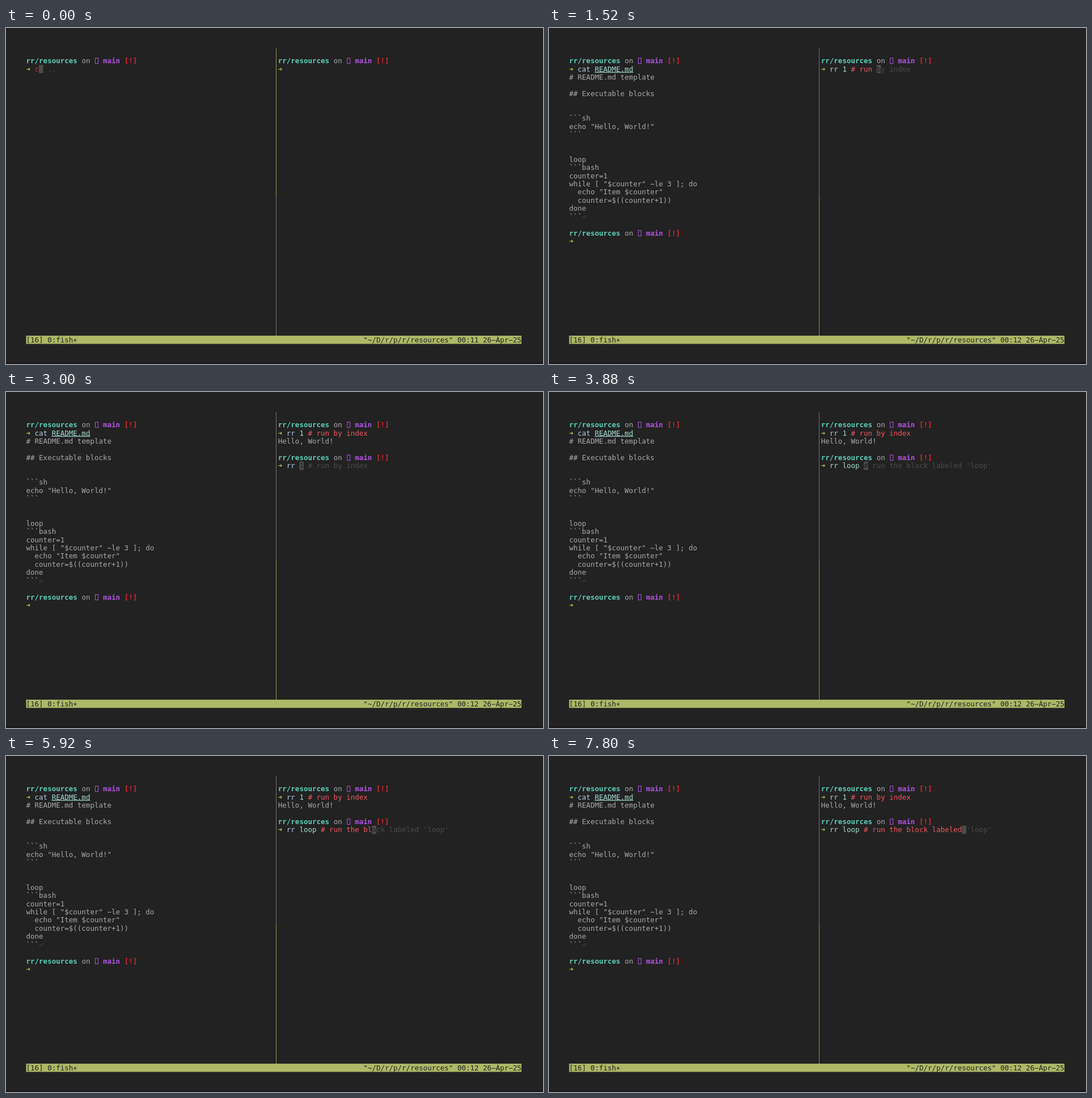
Write an HTML page that moves like this. It is 947x592 px and loops after 8000 ms.

```html
<!DOCTYPE html>
<html lang="en">
<head>
<meta charset="utf-8">
<title>Terminal session</title>
<style>
  html, body { margin: 0; width: 100%; height: 100%; overflow: hidden; background: #222; }
  svg { display: block; width: 947px; height: 592px; }
  text { font: 12.5px "DejaVu Sans Mono", "DejaVu Sans", monospace; white-space: pre; }
  .bold { font-weight: bold; }
  .path { text-decoration: underline; }
</style>
</head>
<body>
<svg id="stage" viewBox="0 0 947 592"></svg>
<script>
const stage = document.getElementById('stage');
const LOOP = 8000, LEFT = 35.5, TOP = 36, CELL_W = 7.53, CELL_H = 14.46;
const RIGHT_PANE = 59, COLUMNS = 116, STATUS_ROW = 35;
const COLOR = {
  text: '#a9a9a9', teal: '#5dcfb8', purple: '#b052e2', red: '#dc2630', arrow: '#b5c248',
  command: '#b9cbe6', argument: '#a5dad0', comment: '#f0575f', hint: '#4b4b4b',
  cursor: '#4c4c4c', ground: '#222', status: '#adb966', active: '#8d974f', idle: '#747474'
};

const README = `# README.md template

## Executable blocks


\`\`\`sh
echo "Hello, World!"
\`\`\`


loop
\`\`\`bash
counter=1
while [ "$counter" \u2212le 3 ]; do
  echo "Item $counter"
  counter=$((counter+1))
done
\`\`\``.replace('\n\n\nloop', '\n\n\n\nloop').split('\n').filter((line, i) => i !== 8);
const CAT = 'cat README.md';
const BY_INDEX = 'rr 1 # run by index';
const BY_LABEL = "rr loop # run the block labeled 'loop'";

const colX = col => LEFT + col * CELL_W;
const rowY = row => TOP + row * CELL_H;

function rect(x, y, w, h, fill) {
  return `<rect x="${x}" y="${y}" width="${w}" height="${h}" fill="${fill}"/>`;
}

function print(col, row, string, fill = COLOR.text, style = '') {
  return `<text x="${colX(col)}" y="${rowY(row) + 11.6}" fill="${fill}" class="${style}">${string}</text>`;
}

function cursor(col, row) {
  return rect(colX(col), rowY(row), CELL_W, CELL_H, COLOR.cursor);
}

function prompt(col, row) {
  return print(col, row, 'rr/resources', COLOR.teal, 'bold') +
    print(col + 13, row, 'on') +
    `<rect x="${colX(col + 16) + 1.5}" y="${rowY(row) + 2.6}" width="5" height="9.6" fill="none" stroke="${COLOR.purple}"/>` +
    print(col + 18, row, 'main', COLOR.purple, 'bold') +
    print(col + 23, row, '[!]', COLOR.red, 'bold') +
    print(col, row + 1, '➜', COLOR.arrow);
}

// A command line with shell highlighting; col is where the typing starts.
function commandLine(col, row, typed) {
  const [, command, args, comment] = typed.match(/^(\S*)([^#]*)(.*)$/);
  const known = command === 'cat' || command === 'rr';
  const argument = args.trim();
  return print(col, row, command, known ? COLOR.command : COLOR.red) +
    (argument && print(col + command.length + 1, row, argument, COLOR.argument,
      command === 'cat' ? 'path' : '')) +
    (comment && print(col + command.length + args.length, row, comment, COLOR.comment));
}

function typing(col, row, typed, suggestion = '') {
  const end = col + typed.length;
  const rest = suggestion.slice(typed.length);
  return commandLine(col, row, typed) + cursor(end, row) +
    print(end, row, rest.slice(0, 1), COLOR.ground) +
    print(end + 1, row, rest.slice(1), COLOR.hint);
}

function leftPane(t) {
  let out = prompt(0, 1);
  if (t < 280) {
    const count = 1 + 2 * Math.floor(t / 40);
    return out + typing(2, 2, CAT.slice(0, count), count === 1 ? 'c  ..' : CAT);
  }
  out += commandLine(2, 2, CAT);
  README.forEach((line, i) => { out += print(0, 3 + i, line); });
  out += print(3, 20, '⏎', COLOR.hint) + prompt(0, 22);
  return t < 1000 ? out + cursor(2, 23) : out;
}

function rightPane(t) {
  const col = RIGHT_PANE + 2;
  let out = prompt(RIGHT_PANE, 1);
  if (t < 1000) return out;
  if (t < 1320) return out + cursor(col, 2);
  if (t < 1760) {
    const count = 1 + 2 * Math.floor((t - 1320) / 40);
    return out + typing(col, 2, BY_INDEX.slice(0, count), count < 4 ? BY_LABEL : BY_INDEX);
  }
  out += commandLine(col, 2, BY_INDEX);
  if (t < 1840) return out + cursor(RIGHT_PANE, 3);
  out += print(RIGHT_PANE, 3, 'Hello, World!') + prompt(RIGHT_PANE, 5);
  if (t < 2480) return out + cursor(col, 6);
  if (t < 2520) return out + typing(col, 6, 'r');
  const count = Math.max(1, Math.floor((t - 2356) / 170.7));
  return out + typing(col, 6, BY_LABEL.slice(0, count), count < 4 ? BY_INDEX : BY_LABEL);
}

function frame(t) {
  const switched = t >= 960;
  const running = t >= 1760 && t < 1840;
  const title = running ? BY_INDEX + ' ~' : '~/D/r/p/r/resources';
  const status = `"${title}" 00:${switched ? 12 : 11} 26\u2212Ápr\u221225`;
  const middle = rowY(18), bottom = rowY(STATUS_ROW);
  return rect(0, 0, 947, 592, COLOR.ground) +
    rect(0, 589, 947, 3, '#1d181b') +
    rect(476, TOP, 1, middle - TOP, switched ? COLOR.idle : COLOR.active) +
    rect(476, middle, 1, bottom - middle, switched ? COLOR.active : COLOR.idle) +
    rect(LEFT, bottom, COLUMNS * CELL_W, CELL_H, COLOR.status) +
    print(0, STATUS_ROW, '[16] 0:fish\u2217', COLOR.ground) +
    print(COLUMNS - status.length, STATUS_ROW, status, COLOR.ground) +
    leftPane(t) + rightPane(t);
}

let shown = '';
const start = performance.now();
function tick(now) {
  // Screen updates land on a 40 ms grid.
  const t = Math.floor(Math.max(0, now - start) % LOOP / 40) * 40;
  const next = frame(t);
  if (next !== shown) stage.innerHTML = shown = next;
  requestAnimationFrame(tick);
}
tick(start);
</script>
</body>
</html>
```
